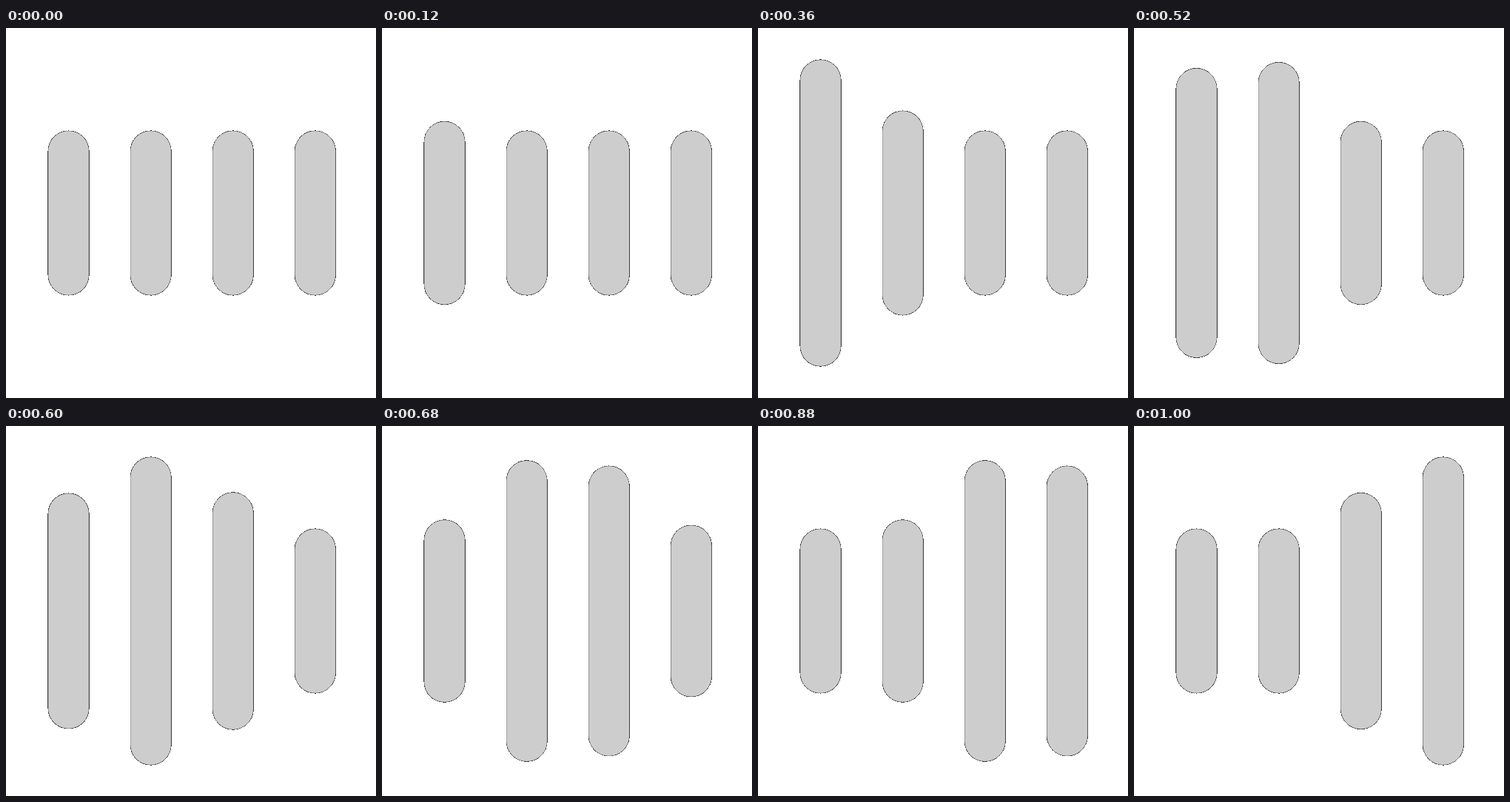
Recreate the animation shown at these times as an HTML page without scripts. Size 500 by 500 pixels, loop 1040 ms.

```html
<!DOCTYPE html>
<html lang="en">
<head>
<meta charset="utf-8">
<title>Four bars</title>
<style>
html, body { margin: 0; width: 100%; height: 100%; overflow: hidden; background: #fff; }
svg { display: block; width: 100%; height: 100%; }

/* how far a bar is stretched: 0 at rest, 1 at full height */
@property --k { syntax: "<number>"; inherits: false; initial-value: 0; }

rect {
  y: calc(138.7px - 97px * var(--k));
  width: 55.56px;
  height: calc(222.6px + 194px * var(--k));
  rx: 27.78px;
  fill: #cdcdcd;
  stroke: #000;
  stroke-width: .56px;
  animation: 1040ms cubic-bezier(.6, 0, .4, 1) infinite;
}
.a { x: 56.75px; animation-name: a; }
.b { x: 167.86px; animation-name: b; }
.c { x: 278.97px; animation-name: c; }
.d { x: 390.08px; animation-name: d; }

/* each bar starts 200 ms after the one before and takes 400 ms each way */
@keyframes a {
  0%, 76.9231%, 100% { --k: 0; }
  38.4615% { --k: 1; }
}
@keyframes b {
  0%, 19.2308%, 96.1538%, 100% { --k: 0; }
  57.6923% { --k: 1; }
}
/* cut off halfway down, so its fall uses the first half of the curve */
@keyframes c {
  0%, 38.4615% { --k: 0; }
  76.9231% { --k: 1; animation-timing-function: cubic-bezier(.6, 0, .8, .5); }
  96.1538%, 100% { --k: .5; }
}
@keyframes d {
  0%, 57.6923% { --k: 0; }
  96.1538%, 100% { --k: 1; }
}
</style>
</head>
<body>
<svg viewBox="0 0 500 500">
  <!-- hard outer edge: every pixel is either fully opaque or clear -->
  <filter id="hard" filterUnits="userSpaceOnUse" x="0" y="0" width="500" height="500" color-interpolation-filters="sRGB">
    <feComponentTransfer><feFuncA type="discrete" tableValues="0 1"/></feComponentTransfer>
  </filter>
  <g filter="url(#hard)">
    <rect class="a"/>
    <rect class="b"/>
    <rect class="c"/>
    <rect class="d"/>
  </g>
</svg>
</body>
</html>
```
